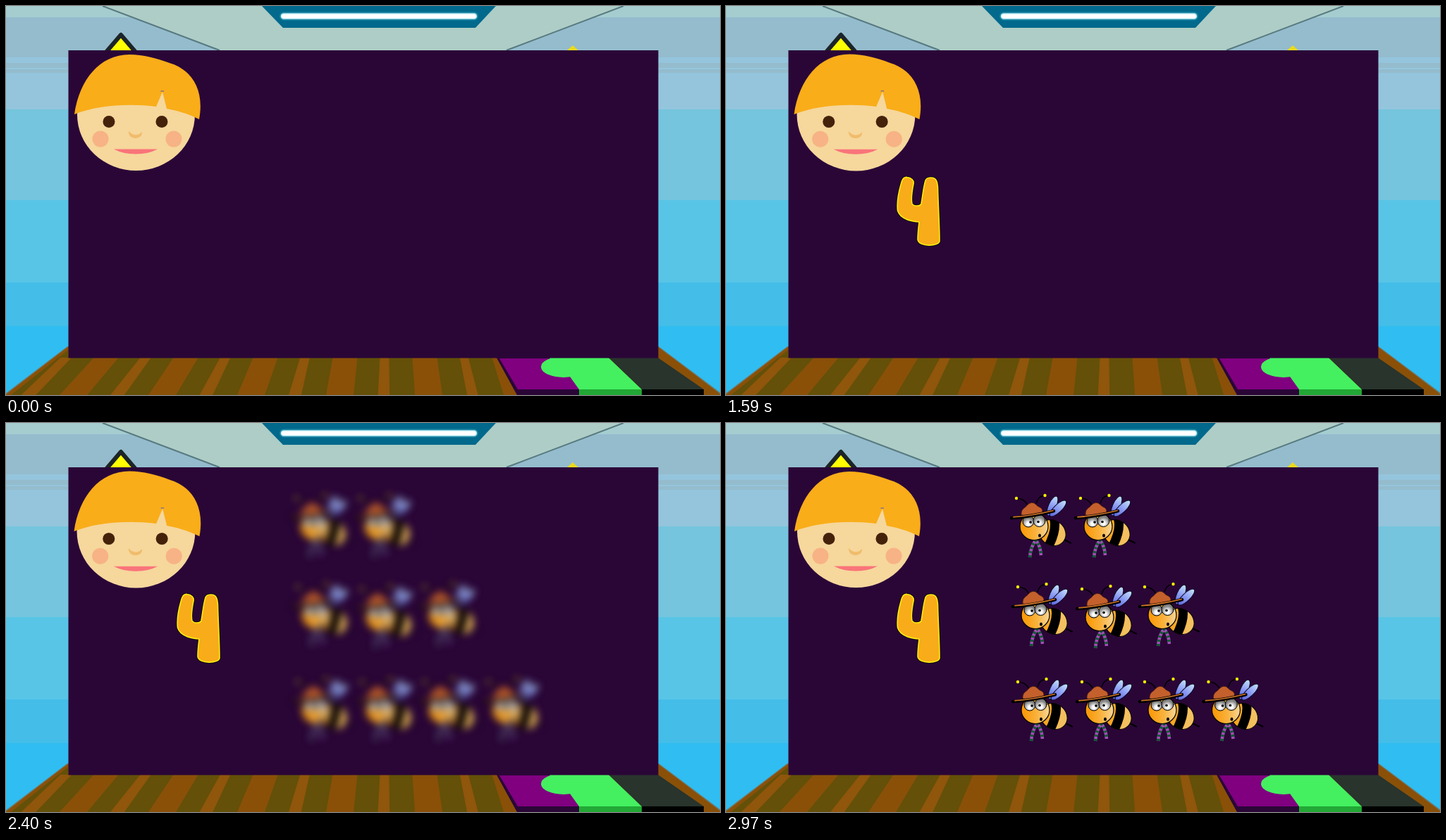
Write an HTML page that moves like this. It is 1013 by 553 pixels and loops after 3730 ms.

```html
<!DOCTYPE html>
<html lang="en">
<head>
<meta charset="utf-8">
<title>Counting bees</title>
<style>
html, body { margin: 0; width: 100%; height: 100%; overflow: hidden; background: #30bdf1; }
svg { display: block; width: 100%; height: 100%; }
</style>
</head>
<body>
<svg viewBox="0 0 1013 553">
  <defs>
    <linearGradient id="skin"><stop offset=".1" stop-color="#fb9a0c"/><stop offset=".55" stop-color="#f9b23c"/><stop offset="1" stop-color="#f6d698"/></linearGradient>
    <linearGradient id="wing" x1="0" y1="1" x2="0" y2="0"><stop offset="0" stop-color="#5a62d8"/><stop offset=".5" stop-color="#8c9cf4"/><stop offset="1" stop-color="#c4e2fa"/></linearGradient>
    <radialGradient id="eye" cx=".5" cy=".7"><stop offset=".25" stop-color="#fff"/><stop offset="1" stop-color="#808080"/></radialGradient>
    <clipPath id="tail"><ellipse cx="463" cy="156" rx="20" ry="17.5" transform="rotate(38 463 156)"/></clipPath>

    <g id="bee" stroke-linecap="round">
      <path d="M412 107Q423 107 428 117M452 103Q443 104 440 114" fill="none" stroke="#000" stroke-width="1.4"/>
      <g fill="#fff000"><circle cx="412" cy="107" r="2.2"/><circle cx="452.500" cy="103" r="2.2"/></g>
      <g fill="url(#wing)" stroke="#0a0820">
        <ellipse cx="463" cy="118" rx="5.500" ry="15" transform="rotate(24 463 118)"/>
        <ellipse cx="471" cy="121.500" rx="5.500" ry="15.500" transform="rotate(46 471 121.500)"/>
      </g>
      <path d="M478 165L489 170.500" stroke="#000" stroke-width="2"/>
      <g clip-path="url(#tail)">
        <path d="M435 130H490V182H435Z" fill="url(#skin)"/>
        <path d="M464 132Q472 150 455 180" fill="none" stroke="#000" stroke-width="13"/>
        <path d="M482 143Q484 158 470 178" fill="none" stroke="#f2c060" stroke-width="11"/>
      </g>
      <ellipse cx="463" cy="156" rx="20" ry="17.500" transform="rotate(38 463 156)" fill="none" stroke="#000"/>
      <g fill="none" stroke-width="4.500" stroke-linecap="butt">
        <path d="M440 166Q432 176 431 191M439 166Q446 174 447 188" stroke="#a450b8"/>
        <path d="M440 166Q432 176 431 191M439 166Q446 174 447 188" stroke="#0c5c30" stroke-dasharray="3 3"/>
      </g>
      <ellipse cx="437" cy="147" rx="20" ry="19.500" fill="url(#skin)" stroke="#000" stroke-width="1.2"/>
      <g fill="url(#eye)" stroke="#000"><circle cx="429" cy="140" r="8"/><circle cx="444.500" cy="139" r="8.500"/></g>
      <circle cx="432" cy="141" r="1.800"/><circle cx="443" cy="140.500" r="1.800"/>
      <ellipse cx="445" cy="160" rx="2" ry="2.600"/>
      <path d="M419 131C418 121 425 121 427 117Q434 110 440 116C442 120 450 119 449 127Q435 133 419 131Z" fill="#c4602c" stroke="#401808" stroke-width=".8"/>
      <path d="M405 135Q434 133 465 125" fill="none" stroke="#000" stroke-width="4.500"/>
      <path d="M408 133.700Q434 132 464 124.500" fill="none" stroke="#d07428" stroke-width="1.800"/>
    </g>

    <path id="four" d="M257 243.500C263 244 267 248 266 253C264 263 262 273 264 281C266 285 276 285 277 281C279 270 280 257 283 248C285 243 294 243 297 246C300 249 300 253 300.500 258C301 285 303 310 303 334C303 342 273 343 272 332C272 323 273 315 274 307C262 306 247 302 243.500 291C242 277 246 260 249.500 249C251 245 254 243 257 243.500Z"/>
  </defs>

  <g id="walls"></g>
  <path d="M137 0H876L710 63H303Z" fill="#adcdc6"/>
  <path d="M137 0L303 63M876 0L710 63" stroke="#587a80" stroke-width="2"/>
  <path d="M363 0H695L666 31H393Z" fill="#00698c"/>
  <g stroke-linecap="round">
    <path d="M394 14.500H664" stroke="#2088a6" stroke-width="12"/>
    <path d="M394 14.500H664" stroke="#b4ecf2" stroke-width="8.500"/>
    <path d="M394 14.500H664" stroke="#fff" stroke-width="6"/>
  </g>
  <path d="M163 41L134 75H192Z" fill="#ff0" stroke="#1c2428" stroke-width="6" stroke-linejoin="round"/>
  <path d="M795 64L804 56L813 64Z" fill="#ecd91c"/>

  <path d="M88 484L0 552V553H1013V551L925 484Z" fill="#8a5008"/>
  <path d="M88 484L0 551M925 484L1013 550" stroke="#78705a" stroke-width="1.200"/>
  <g id="floor"></g>
  <path d="M696 500H790L830 553H725Z" fill="#2a0637"/>
  <path d="M700 501H790L820 545H726Z" fill="#800080"/>
  <path d="M771 500H855L902 545H813L798 524Z" fill="#44f060"/>
  <ellipse cx="791" cy="513" rx="32" ry="15" fill="#44f060"/>
  <path d="M813 545H902V553H813Z" fill="#22a834"/>
  <path d="M855 500H925L990 545V553H902V545Z" fill="#28342c"/>
  <path d="M902 545H990V553H902Z"/>

  <path d="M88.500 63H925.500V500.500H88.500Z" fill="#2a0637"/>

  <g id="face">
    <ellipse cx="184.500" cy="154.500" rx="83.500" ry="79.500" fill="#f6d79c"/>
    <path d="M97 154C104 105 133 69 175 69C195 69 213 74 232 81C263 90 282 119 274 161Q252 150 228 146L222 122L213 143C175 138 128 141 97 154Z" fill="#f9ad19"/>
    <path d="M219.500 121H224" stroke="#8a7088" stroke-width="1.500"/>
    <g fill="#44220a"><circle cx="146" cy="164.500" r="8.500"/><circle cx="221" cy="164.500" r="8.500"/></g>
    <g fill="#f7b385"><circle cx="134" cy="189" r="11.500"/><circle cx="238" cy="189" r="11.500"/></g>
    <path d="M174 178C173 191 194 191 193 179Q184 188 174 178Z" fill="#f0bc6c"/>
    <path id="mouth" d="M153 203.500H215Q202 210.500 184 210.500T153 203.500Z" fill="#f9747a"/>
  </g>

  <g id="digit" stroke-linejoin="round">
    <use href="#four" fill="none" stroke="#140418" stroke-width="4"/>
    <use href="#four" fill="#f9ac19" stroke="#ffec10" stroke-width="1.600"/>
  </g>
  <g id="bees"></g>
</svg>
<script>
const LOOP = 3730;
const $ = id => document.getElementById(id);
const clamp = v => Math.min(1, Math.max(0, v));

const bands = [
  [0, '#a5cdd0'], [16, '#94bccd'], [73, '#94c5dd'], [81, '#94bccd'], [88, '#94c5dd'],
  [90, '#94bccd'], [95, '#94c5dd'], [147, '#74c5dd'], [276, '#58c5e6'], [393, '#44bde9'], [455, '#30bdf1']
];
$('walls').innerHTML = bands.map(([y, c]) =>
  `<rect y="${y}" width="1013" height="${553 - y}" fill="${c}"/>`).join('');

// floor planks spread from the panel's foot to the bottom edge
const head = i => 85 + 113 * i, foot = i => 32 + 126 * i;
const plank = (a, b, c, wide = 0) =>
  `<path d="M${head(a) - wide} 500H${head(b) + wide}L${foot(b) + wide * 1.3} 553H${foot(a) - wide * 1.3}Z" fill="${c}"/>`;
let planks = '<path d="M88 489L7 553H32L88 500Z" fill="#645008"/>';
for (let i = 0; i < 6; i++) {
  planks += plank(i, i + 0.35, '#645008');
  if (i < 5) planks += plank(i + 0.66, i + 1, '#645008');
  planks += plank(i, i, '#8f560c', 8 - i * 0.4);
}
$('floor').innerHTML = planks;

const rows = [[[0, 0], [91, 0]], [[2, 126], [93, 129], [182, 126]], [[2, 261], [93, 261], [182, 261], [272.5, 261]]];
$('bees').innerHTML = rows.flat().map(([x, y]) => `<use href="#bee" x="${x}" y="${y}"/>`).join('');

// fades in while blurring, then sharpens
function appear(el, t, start, dur) {
  const p = clamp((t - start) / dur);
  const blur = 6.5 * (p < 0.4 ? p / 0.4 : (1 - p) / 0.6);
  el.style.display = p ? '' : 'none';
  el.style.opacity = clamp(p / 0.4);
  el.style.filter = blur > 0.05 ? `blur(${blur}px)` : 'none';
}

function scaleAt(el, x, y, sx, sy) {
  el.setAttribute('transform', `translate(${x} ${y}) scale(${sx} ${sy}) translate(${-x} ${-y})`);
}

function draw(t) {
  appear($('digit'), t, 475, 855);
  appear($('bees'), t, 2075, 885);
  const grow = t >= 1590 && t < 2970 ? 1.005 : 1;
  scaleAt($('face'), 186, 151, grow, grow);
  const open = Math.sin(Math.PI * clamp((t - 1590) / 800));
  scaleAt($('mouth'), 184, 206.5, 1, 1 + 0.85 * open);
}

const begin = performance.now();
function tick() {
  draw((performance.now() - begin) % LOOP);
  requestAnimationFrame(tick);
}
tick();
</script>
</body>
</html>
```
